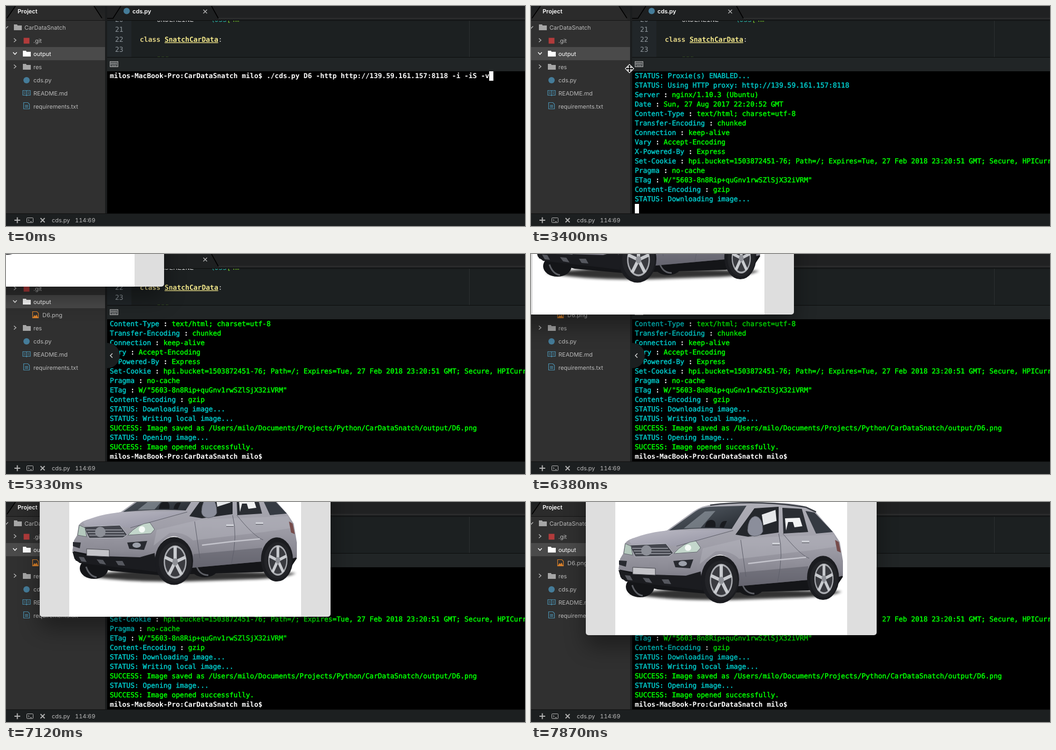
Animation, 985 px wide and 418 px high, one loop 8 s. Source, as an HTML page:

```html
<!DOCTYPE html>
<html lang="en">
<head>
<meta charset="utf-8">
<title>Terminal session</title>
<style>
html, body { margin: 0; width: 100%; height: 100%; overflow: hidden; background: #000; }
svg { display: block; width: 985px; height: 418px; }
text { white-space: pre; text-rendering: geometricPrecision; }
.ui { font: 11px Inter, "Open Sans", sans-serif; font-variant-numeric: tabular-nums; fill: #bababa; }
.b { font-weight: 600; fill: #fff; }
.code { font: 13px "DejaVu Sans Mono", "Liberation Mono", monospace; }
.bold { font-weight: bold; }
#term text { stroke-width: .5; }
.line { fill: none; stroke: #b4b4b4; stroke-width: 1.4; }
.blue { fill: none; stroke: #4a8fae; stroke-width: 1.2; }
</style>
</head>
<body>
<svg viewBox="0 0 985 418" xmlns="http://www.w3.org/2000/svg">
  <defs>
    <clipPath id="edClip"><rect x="192" y="28" width="793" height="69"/></clipPath>
    <clipPath id="termClip"><rect x="192" y="124" width="793" height="270"/></clipPath>
    <filter id="blur" filterUnits="userSpaceOnUse" x="0" y="-300" width="800" height="720">
      <feGaussianBlur stdDeviation="21"/>
    </filter>
    <filter id="soft" x="-20%" y="-80%" width="140%" height="260%"><feGaussianBlur stdDeviation="2.500"/></filter>
    <linearGradient id="bar" x2="0" y2="1"><stop stop-color="#1e2021"/><stop offset="1" stop-color="#262626"/></linearGradient>
    <linearGradient id="paint" x2="0" y2="1">
      <stop stop-color="#aeaeb6"/><stop offset=".5" stop-color="#a09fa9"/><stop offset=".8" stop-color="#8a8993"/><stop offset="1" stop-color="#6c6b76"/>
    </linearGradient>
    <linearGradient id="hood" x2="1" y2="1"><stop stop-color="#bdbcc6"/><stop offset="1" stop-color="#9190a0"/></linearGradient>
    <linearGradient id="glass" x2="1" y2="1"><stop stop-color="#59616a"/><stop offset="1" stop-color="#23272d"/></linearGradient>
    <path id="folder" d="M0 1h6l1 2h8v9H0z"/>
    <path id="chev" class="line" d="M-2 -3.5L2 0L-2 3.5"/>
  </defs>

  <!-- side panel -->
  <rect width="188" height="394" fill="#303030"/>
  <rect width="188" height="28" fill="url(#bar)"/>
  <path d="M0 28L18 0H168L184 28z" fill="#2b2b2b"/>
  <path d="M2 23L18 0M167 0L182 23" stroke="#000" stroke-width="1.6"/>
  <path d="M0 27.5H188" stroke="#161616"/>
  <text class="ui b" x="22" y="14">Project</text>
  <rect y="78" width="188" height="25" fill="#4a4a4a"/>
  <path class="line" d="M-2 38.500L0 42.500L4 38.500"/>
  <use href="#folder" x="15" y="34" fill="#a6a6a6"/>
  <text class="ui" x="35" y="45">CarDataSnatch</text>
  <use href="#chev" x="17" y="65"/>
  <rect x="33.500" y="60.500" width="11" height="11" fill="#b23b3b"/>
  <text class="ui" x="52" y="70">.git</text>
  <path class="line" d="M13.500 88L17 92L20.500 88" style="stroke:#fff"/>
  <use href="#folder" x="32" y="84" fill="#fff"/>
  <text class="ui" x="52" y="95" style="fill:#fff">output</text>
  <g id="png">
    <path d="M50.500 109.500h8l3 3v9h-11z" fill="none" stroke="#d8802a" stroke-width="1.2"/>
    <path d="M51 121l3-5 2 2 2-3 3 6z" fill="#d8802a"/>
    <text class="ui" x="69" y="120">D6.png</text>
  </g>
  <g id="rest">
    <use href="#chev" x="17" y="115"/>
    <use href="#folder" x="32" y="109" fill="#a6a6a6"/>
    <text class="ui" x="52" y="120">res</text>
    <circle cx="39" cy="141" r="6" fill="#457c99"/>
    <text class="ui" x="52" y="145">cds.py</text>
    <path class="blue" d="M32 160.500h6l1 1 1-1h6v9h-6l-1 1-1-1h-6zM39 161v9M34 163.500h3M34 166.500h3M41 163.500h3M41 166.500h3"/>
    <text class="ui" x="52" y="170">README.md</text>
    <path class="blue" d="M33.500 183.500h8l3 3v9h-11zM36 188.500h6M36 190.500h6M36 192.500h6"/>
    <text class="ui" x="52" y="195">requirements.txt</text>
  </g>
  <rect x="188" width="4" height="394" fill="#1b1d1e"/>

  <!-- editor -->
  <rect x="192" width="793" height="97" fill="#1c2021"/>
  <rect x="192" y="28" width="46" height="69" fill="#212629"/>
  <rect x="192" width="793" height="28" fill="#202122"/>
  <path d="M192 28L203 24L218 0H390L403 24L985 24V28z" fill="#1e2021"/>
  <path d="M192 23.500H203L218 0M390 0L403 23.500" fill="none" stroke="#000" stroke-width="1.6"/>
  <path d="M403 23.500H985" stroke="#3a3a3a"/>
  <path d="M192 27.500H985" stroke="#0c0d0d"/>
  <circle cx="229" cy="9.500" r="6" fill="#457c99"/>
  <text class="ui b" x="240" y="14">cds.py</text>
  <path class="line" d="M374.500 7L381.500 14M381.500 7L374.500 14"/>
  <g clip-path="url(#edClip)" class="code">
    <path d="M879.500 28V97" stroke="#2c3031"/>
    <g fill="#8d959b">
      <text x="207" y="30">20</text><text x="207" y="49">21</text>
      <text x="207" y="68">22</text><text x="207" y="87">23</text>
    </g>
    <text x="286" y="30" fill="#d0d0d0">UNDERLINE = <tspan fill="#7fd62a">'</tspan><tspan fill="#2ab5a8">\033</tspan><tspan fill="#7fd62a">[4m'</tspan></text>
    <text class="bold" x="254" y="68" fill="#ded083">class <tspan fill="#f3e88b" text-decoration="underline">SnatchCarData</tspan><tspan fill="#d8d8d8" font-weight="400">:</tspan></text>
    <text x="286" y="105.500" fill="#7fd62a">"""</text>
  </g>
  <rect x="192" y="97" width="793" height="1" fill="#0c0d0d"/>
  <rect x="192" y="98" width="793" height="26" fill="#212526"/>
  <rect x="197.500" y="105.500" width="15" height="10" fill="#4a4e50" stroke="#b0b0b0"/>
  <path d="M199 108.500H211M199 110.500H211M201 113.500H209" stroke="#b0b0b0" stroke-dasharray="2 1"/>

  <!-- terminal -->
  <rect x="192" y="124" width="793" height="270" fill="#000"/>
  <g clip-path="url(#termClip)">
    <g id="term" class="code"></g>
    <rect id="block" width="8" height="18" fill="#fff"/>
  </g>
  <g id="toggle">
    <path d="M188 169H192A24 24 0 0 1 192 217H188z" fill="#1b1f20"/>
    <path class="line" d="M202 189L198 193L202 197" style="stroke:#ddd"/>
  </g>

  <!-- status bar -->
  <rect y="394" width="985" height="24" fill="#1c1f20"/>
  <path d="M0 394.500H985" stroke="#111"/>
  <path class="line" d="M16 407H27M21.500 401.500V412.500" style="stroke-width:2"/>
  <rect x="39.500" y="402.500" width="12" height="9" rx="1" class="line" style="stroke-width:1"/>
  <path class="line" d="M42 405L44 407L42 409M45.500 409.500H49" style="stroke-width:1"/>
  <path class="line" d="M65.500 403L73.500 411M73.500 403L65.500 411" style="stroke-width:1.800"/>
  <text class="ui" x="87" y="411">cds.py</text>
  <text class="ui" x="131" y="411">114:69</text>

  <!-- picture window, drawn at its final place -->
  <g id="win">
    <rect x="104" y="-130" width="552" height="405" rx="6" filter="url(#blur)" opacity=".38"/>
    <rect x="104" y="-200" width="552" height="453" rx="5" fill="#dedede"/>
    <rect x="160" y="-200" width="440" height="453" fill="#fff"/>
    <path d="M184 174Q300 160 420 166L590 170Q570 180 500 182L380 186Q260 188 184 174z" opacity=".8" filter="url(#soft)"/>
    <!-- underside and far wheels -->
    <g fill="#141518">
      <ellipse cx="207" cy="161" rx="27" ry="20"/>
      <ellipse cx="417" cy="158" rx="27" ry="20"/>
      <path d="M168 128L300 128L580 118L592 142L580 160L526 168L390 172L330 174L240 166L186 152L172 146z"/>
    </g>
    <path d="M192 158Q198 176 212 178M402 158Q408 174 424 174" fill="none" stroke="#5c5e64" stroke-width="3"/>
    <!-- body -->
    <path d="M166 128L169 108L175 98L178 79Q183 71 200 67L258 54L308 18Q325 6 350 4L430 1Q500 0 524 10L541 20L575 59L586 76L592 112L592 140L578 144Q576 101 553 103Q530 107 526 148L392 160Q390 102 358 100Q330 103 322 146L240 142Z" fill="url(#paint)"/>
    <path d="M186 73Q215 58 262 54L378 53Q350 62 318 74L276 84L240 80L190 80z" fill="url(#hood)"/>
    <path d="M326 88L410 68L575 62L585 84L530 92L395 108Q376 90 350 94L320 118z" fill="#b4b3bd" opacity=".45"/>
    <path d="M396 134L526 122V148L393 160z" fill="#62616b" opacity=".6"/>
    <!-- glass -->
    <path d="M262 54L312 18Q322 10 340 9L409 7L381 51Q320 48 262 54z" fill="url(#glass)"/>
    <path d="M290 50L330 18L350 17L322 49z" fill="#98a1a8" opacity=".6"/>
    <path d="M330 48q2-14 12-14t8 14zM358 48q2-12 10-12l4 0-6 13z" fill="#191b1f"/>
    <path d="M388 62L424 12L470 9L470 58L412 66z" fill="#24272c"/>
    <path d="M438 24L464 15L466 36L441 44z" fill="#e6e8ea"/>
    <path d="M477 11L514 13L526 57L479 60z" fill="#2a2d33"/>
    <path d="M482 31L510 30L515 46L500 48L497 38L488 38L484 54z" fill="#f2f3f4"/>
    <path d="M521 17L538 20L573 57L541 60z" fill="#353a42"/>
    <path d="M340 6Q430 -5 522 10L541 19" fill="none" stroke="#3a3d44" stroke-width="2.500"/>
    <path d="M411 54Q412 30 425 27Q440 28 440 56Q437 64 424 65Q412 64 411 54z" fill="#8b8e9b" stroke="#5c5f69"/>
    <!-- seams and trim -->
    <path d="M470 60Q480 98 468 152M398 72L408 142M478 60Q510 100 528 107M276 84Q340 66 384 54" fill="none" stroke="#5f606b"/>
    <path d="M412 117L470 110L522 105" fill="none" stroke="#c4c4cc" stroke-width="2.500"/>
    <path d="M458 79h14M514 75h14" stroke="#d2d4da" stroke-width="3"/>
    <path d="M458 81.500h14M514 77.500h14" stroke="#55565e"/>
    <path d="M187 82L256 79L270 97L262 103L198 104z" fill="#44464e" stroke="#c0c2ca"/>
    <path d="M192 88H260M195 93H264M198 98H266" stroke="#a0a2aa" stroke-width="1.500"/>
    <circle cx="219" cy="92" r="10" fill="#8d9098"/>
    <path d="M271 98Q290 76 313 74L322 87L315 95z" fill="#c3d6cb" stroke="#63686e"/>
    <path d="M176 98L179 79L190 84L193 101z" fill="#b4c8bd" stroke="#63686e"/>
    <circle cx="298" cy="87" r="6" fill="#f6fbf8"/>
    <path d="M167 111L182 112L180 123L167 119zM270 112L308 109L302 126L274 124z" fill="#282a30"/>
    <ellipse cx="288" cy="117" rx="8" ry="5" fill="#9ca0aa"/>
    <path d="M166 129L194 137L294 140L322 132L326 168L296 164L180 151L170 143z" fill="#1b1c20"/>
    <path d="M178 139l10 1 5 9-10-1zM212 144l12 1 6 9-12-2zM248 147l13 0 5 9-13-1z" fill="#55575e"/>
    <path d="M193 124L236 126V139L193 137z" fill="#c4c4c9" stroke="#45464c"/>
    <path d="M577 72L584 76L588 96L581 93z" fill="#774c4b"/>
    <g id="wheels"></g>
  </g>

  <!-- pointers -->
  <path id="arrow" d="M0 0V14.500L3.400 11.400L5.800 17L8.200 16L5.900 10.600H10.400z" fill="#000" stroke="#fff" stroke-width="1.100"/>
  <path id="resize" d="M-8 0L-4 -4V-1.500H-1.500V-4H-4L0 -8L4 -4H1.500V-1.500H4V-4L8 0L4 4V1.500H1.500V4H4L0 8L-4 4H-1.500V1.500H-4V4z" fill="#000" stroke="#fff" stroke-width="1.100"/>
</svg>
<script>
const $ = id => document.getElementById(id);
const NS = "http://www.w3.org/2000/svg";
const CYAN = "#00c8c8", GREEN = "#00ff00", WHITE = "#fff";
const ROW = 18, CHAR = 7.826, LEFT = 197, TOP = 124, LOOP = 8000;

function add(parent, tag, attrs, text) {
  const el = document.createElementNS(NS, tag);
  for (const k in attrs) el.setAttribute(k, attrs[k]);
  if (text) el.textContent = text;
  return parent.appendChild(el);
}

const prompt = "milos-MacBook-Pro:CarDataSnatch milo$ ";
const command = prompt + "./cds.py D6 -http http://139.59.161.157:8118 -i -iS -v";
const output = [
  command,
  "STATUS: Proxie(s) ENABLED...",
  "STATUS: Using HTTP proxy: http://139.59.161.157:8118",
  "Server : nginx/1.10.3 (Ubuntu)",
  "Date : Sun, 27 Aug 2017 22:20:52 GMT",
  "Content-Type : text/html; charset=utf-8",
  "Transfer-Encoding : chunked",
  "Connection : keep-alive",
  "Vary : Accept-Encoding",
  "X-Powered-By : Express",
  "Set-Cookie : hpi.bucket=1503872451-76; Path=/; Expires=Tue, 27 Feb 2018 23:20:51 GMT; Secure, HPICurrent",
  "Pragma : no-cache",
  'ETag : W/"5603-8n8Rip+quGnv1rwSZlSjX32iVRM"',
  "Content-Encoding : gzip",
  "STATUS: Downloading image...",
  "STATUS: Writing local image...",
  "SUCCESS: Image saved as /Users/milo/Documents/Projects/Python/CarDataSnatch/output/D6.png",
  "STATUS: Opening image...",
  "SUCCESS: Image opened successfully.",
  prompt
];

const lines = output.map((s, i) => {
  const el = add($("term"), "text", { x: LEFT, y: TOP + 13 + i * ROW });
  const part = (text, color) => add(el, "tspan", { fill: color, stroke: color }, text);
  const cut = s.indexOf(" : ");
  if (s.startsWith(prompt)) {
    el.setAttribute("class", "bold");
    add(el, "tspan", { fill: WHITE }, s);
  } else if (cut > 0) {
    part(s.slice(0, cut), CYAN);
    part(" : ", WHITE);
    part(s.slice(cut + 3), GREEN);
  } else part(s, s.startsWith("SUCCESS") ? GREEN : CYAN);
  return el;
});

function wheel(x, y, rx, ry) {
  const g = add($("wheels"), "g", { transform: `translate(${x} ${y}) scale(${rx / 30} ${ry / 38})` });
  const disc = (r, k, fill, dx = 0, dy = 0) => add(g, "ellipse", { cx: dx, cy: dy, rx: r, ry: r * k, fill });
  disc(35, 1.3, "#1b1c20", -2, -2);
  disc(30, 1.267, "#232428");
  disc(21, 1.5, "#a9abb0");
  disc(18.500, 1.5, "#3a3b40");
  for (let i = 0; i < 5; i++) {
    const a = i * Math.PI * .4 - Math.PI / 2;
    add(g, "path", { d: `M0 0L${20 * Math.cos(a)} ${30 * Math.sin(a)}`, stroke: "#c9cbcf", "stroke-width": 6 });
  }
  disc(5, 1.4, "#8f9197");
}
wheel(361, 149, 31, 38);
wheel(556, 146, 26, 35);

// [time, value...]: each row holds until the next
const printed = [[0, 1], [1640, 3], [1930, 4], [2080, 6], [2230, 7], [2370, 9], [2520, 10],
  [2670, 12], [2820, 13], [2960, 15], [3550, 18], [3700, 20]];
const pointer = [[3110, 290, 108], [3260, 232, 114], [3400, 187, 119], [3550, 150, 112], [3700, 122, 108],
  [3850, 102, 118], [4000, 89, 128], [4150, 83, 131], [4290, 83, 118], [5040, 102, 107]];
// right and bottom edge of the window
const drag = [[4890, 300, 62], [6230, 405, 88], [6380, 499, 115], [6530, 532, 142], [6680, 560, 166],
  [6820, 583, 187], [6970, 601, 204], [7120, 616, 218], [7270, 626, 226],
  [7420, 635, 234], [7570, 643, 242], [7720, 650, 248], [7870, 656, 253]];

const at = (rows, t) => rows.filter(r => r[0] <= t).pop();
const show = (el, on) => el.setAttribute("visibility", on ? "visible" : "hidden");
const move = (el, x, y) => el.setAttribute("transform", `translate(${x} ${y})`);

function draw(t) {
  const n = at(printed, t)[1];
  const done = n === output.length;
  const first = Math.max(0, n - (done ? 15 : 14));
  lines.forEach((el, i) => show(el, i < n));
  move($("term"), 0, -first * ROW);

  const typing = t < 1040;
  show($("block"), typing || t >= 1190 && !done);
  move($("block"), typing ? LEFT + command.length * CHAR : LEFT, TOP + (typing ? 0 : (n - first) * ROW));

  show($("png"), done);
  move($("rest"), 0, done ? 25 : 0);
  show($("toggle"), t >= 3550);

  const w = at(drag, t);
  show($("win"), w);
  if (w) move($("win"), w[1] - 656, w[2] - 253);

  const p = t < 5330 && at(pointer, t);
  const sizing = p && p[0] === 3400;
  show($("arrow"), p && !sizing);
  show($("resize"), sizing);
  if (p) move(sizing ? $("resize") : $("arrow"), p[1], p[2]);
}

const start = performance.now();
function tick() {
  draw((performance.now() - start) % LOOP);
  requestAnimationFrame(tick);
}
draw(0);
requestAnimationFrame(tick);
</script>
</body>
</html>
```
